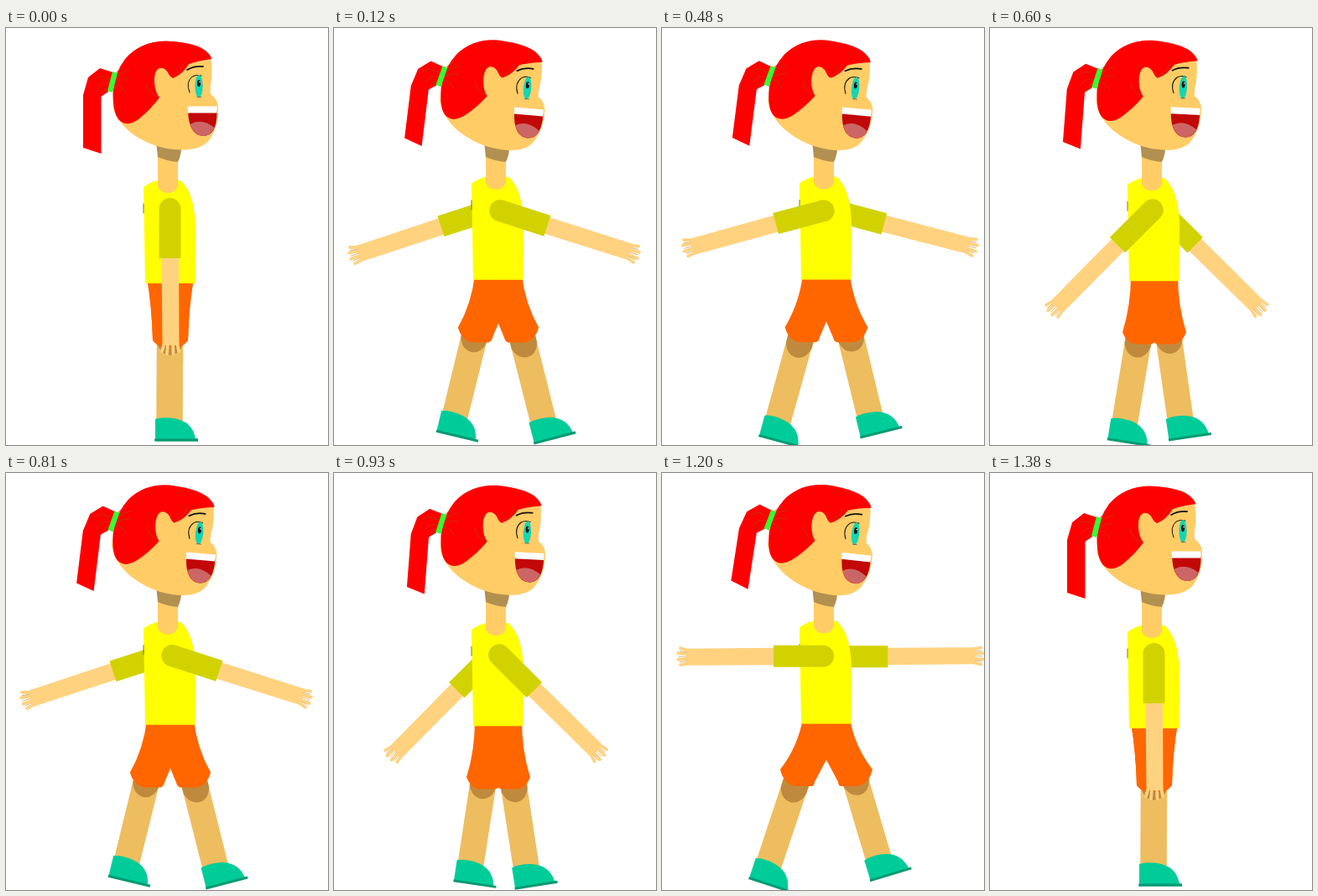
An HTML page without scripts for the animation above (1.41 s loop, 384 by 498 pixels).

```html
<!DOCTYPE html>
<html lang="en">
<head>
<meta charset="utf-8">
<title>Walk cycle</title>
<style>
  @property --swing { syntax: "<number>"; inherits: true; initial-value: 0; }

  html, body { margin: 0; width: 100%; height: 100%; overflow: hidden; background: #fff; }

  /* --swing: near arm angle in degrees, forward positive; --lift: its size */
  svg {
    display: block; width: 384px; height: 498px;
    animation: swing 1410ms -1ms infinite;
    --lift: max(var(--swing), -1 * var(--swing));
  }
  @keyframes swing {
    0%, 48.936% { --swing: 0; animation-timing-function: steps(5); }
    10.638%, 59.574% { --swing: 90; animation-timing-function: steps(6); }
    23.404%, 72.34% { --swing: 0; animation-timing-function: steps(6); }
    36.17%, 85.106% { --swing: -90; animation-timing-function: steps(6); }
    97.872%, 100% { --swing: 0; }
  }

  .arm { transform-origin: 195.5px 216px; }
  .near.arm {
    transform: translate(calc(var(--swing) * .038px), calc(var(--lift) * .03px))
               rotate(calc(var(--swing) * -1deg));
  }
  .far.arm {
    transform: translate(calc(var(--swing) * -.165px), calc(var(--lift) * .035px))
               rotate(calc(var(--swing) * 1deg));
  }

  .leg { transform-origin: 195px 251px; }
  .near.leg { transform: rotate(calc(var(--swing) * .187deg)); }
  .far.leg { transform: translateY(calc(var(--lift) * .1px)) rotate(calc(var(--swing) * -.201deg)); }

  .torso { transform: translateY(calc(var(--lift) * -.06px)); }
  .head {
    transform-origin: 205px 98px;
    transform: translateX(calc(var(--lift) * -.025px)) rotate(calc(var(--lift) * .07deg));
  }
  .tail { transform-origin: 126px 64px; transform: rotate(calc(var(--lift) * .027deg)); }

  .shorts {
    --rest: path("M168 298Q174 335 175 373Q180 379 186 381L207 381Q213 378 217 373Q218 330 224 298Z");
    --spread: path("M168 293Q162 327 141 354Q145 371 158 374L179 374Q182 373 182 369Q199 336 224 293Z");
    fill: #f60;
    d: var(--rest);
    animation: stride 1410ms -1ms infinite;
  }
  @keyframes stride {
    0%, 48.936% { d: var(--rest); animation-timing-function: steps(5); }
    10.638%, 36.17%, 59.574%, 85.106% { d: var(--spread); animation-timing-function: steps(6); }
    23.404%, 72.34% { d: var(--rest); animation-timing-function: steps(6); }
    97.872%, 100% { d: var(--rest); }
  }

  .line { fill: none; stroke: #111; stroke-linecap: round; }
  .strand { fill: none; stroke: #b93a10; stroke-width: .8; }
</style>
</head>
<body>
<svg viewBox="0 0 384 498">
  <defs>
    <g id="arm">
      <path fill="#ffd27f" d="M185.5 270H206L206.5 379H186.5Z"/>
      <path fill="none" stroke="#ffd27f" stroke-width="3.8" stroke-linecap="round"
            d="M189 376L186 386M193 377L192 389M199 377L199.5 389M204 376L206 386"/>
      <path class="line" style="stroke:#b88f48;stroke-width:.6" d="M190.8 379L189.5 387M196 379V388M201.7 379L202.5 387"/>
      <path fill="#d2d200" d="M182.5 275V216a13 13 0 0 1 26 0V275Z"/>
    </g>
    <g id="leg">
      <path fill="#eebd60" d="M180 340H211.5L210.5 472H179.5Z"/>
      <path fill="#c08a3e" d="M180 360H211.5V375Q208 390 196 390.5Q184 390 180 376Z"/>
      <path fill="#00cc99" d="M178 492V467Q186 464 200 466Q223 470 226 492Z"/>
      <path fill="#079a72" d="M177.5 490.5H229V493.5H177.5Z"/>
    </g>
  </defs>

  <use href="#arm" class="far arm"/>
  <use href="#leg" class="far leg"/>
  <use href="#leg" class="near leg"/>
  <path class="shorts"/>
  <path class="shorts" transform="matrix(-1 0 0 1 392 0)"/>

  <g class="torso">
    <path fill="#ff0" d="M164 190Q172 184 181 182H208Q224.5 196 226 236L225.5 305H166Z"/>
    <path class="line" style="stroke:#55550a;stroke-width:.8" d="M164 210V221"/>
    <path fill="#fc6" d="M181 140H205V189Q202 197 193 197Q184 197 181 189Z"/>
  </g>
  <path fill="#b2904f" d="M179.5 140H209.5Q209 152 205 160Q192 159 181 154Z"/>

  <g class="head">
    <path fill="#fc6" d="M130 60L180 30L244 34Q246 50 245 62Q243 72 244 79Q252 84 253 94Q254 116 243 133Q234 145 212 145.5Q180 146 153 128Q132 113 127.5 94Z"/>
    <g class="tail">
      <path fill="#f00" d="M131 54L112 48L98 59L92 80V143L113.5 150V82L122 76Z"/>
      <path class="strand" d="M124 61Q112 54 104 62M123 66Q114 64 108 74M122 71Q116 74 114 81"/>
    </g>
    <path fill="#f00" d="M183 83Q172 98 158 109Q144 119 135 110Q127.5 102 127.5 78Q129 54 142 37Q160 16 190 15.5Q230 17 241 30Q245 34 245 37Q229 39 218 43Q210 56 199 60Q195 58 193 53Q189 47 183 48Q176 51 177 66Q178 77 183 83Z"/>
    <path class="strand" d="M130 61Q140 50 147 51M130 65Q138 60 147 60M129 69Q138 68 143 78M129 57Q133 50 139 47M167 67Q169 78 181 82M200 58Q208 53 213 41"/>
    <path fill="#3f3" d="M127 52L133 54L127 77L121 75Z"/>

    <path class="line" stroke-width="1.8" d="M216 50Q224 45 235 46"/>
    <path class="line" stroke-width="1" d="M219 77Q214 65 222 58Q227 55 233 57"/>
    <ellipse cx="230" cy="69.5" rx="4.6" ry="13.5" fill="#12d6b5"/>
    <path class="line" style="stroke:#444;stroke-width:.6" d="M228 82.5H233"/>
    <ellipse cx="230" cy="66" rx="2" ry="4" fill="#111"/>
    <circle cx="231" cy="64.5" r=".8" fill="#fff"/>

    <path fill="#c20808" d="M217 99H251.5Q252 129 235 129Q218 128 217 99Z"/>
    <path fill="#c66" d="M219.5 115Q233 107 248.5 119Q244 129 235 129Q224 128 219.5 115Z"/>
    <path fill="#fff" d="M216.5 93.5H251.5V101.5H217Z"/>
  </g>

  <use href="#arm" class="near arm"/>
</svg>
</body>
</html>
```
